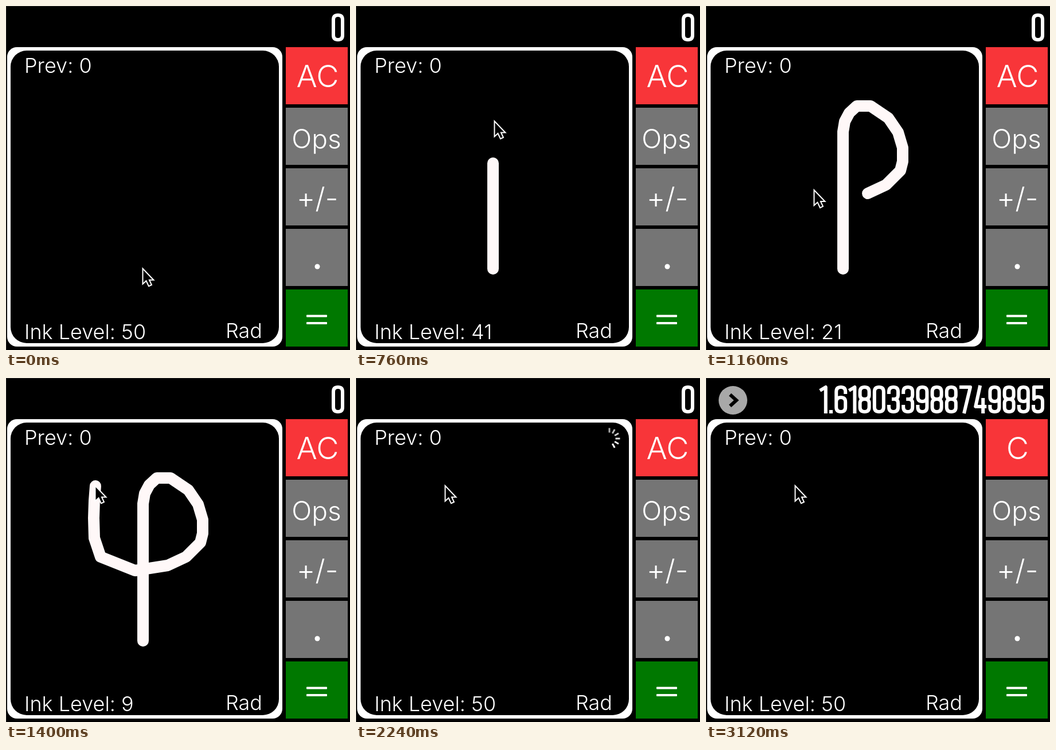
These frames come from a looping animation (600 px wide and 602 px high, 3680 ms). An HTML page with a canvas:

```html
<!DOCTYPE html>
<html lang="en">
<head>
<meta charset="utf-8">
<title>Ink calculator</title>
<style>
  html, body { margin: 0; width: 100%; height: 100%; overflow: hidden; background: #000; }
  canvas { display: block; }
</style>
</head>
<body>
<canvas id="stage" width="600" height="602"></canvas>
<script>
const ctx = document.getElementById('stage').getContext('2d');
const LOOP = 3680, TICK = 40;
const SUBMIT = 1840, RESULT = 2960;
const INK_START = 560, INK_FULL = 50;

// Pen positions: x, y, tick at which the ink reaches them
const pen = [
  [239, 460, 16], [239, 420, 17], [239, 345, 18], [239, 275, 19], [239, 220, 20],
  [242, 202, 20.6], [250, 187, 21], [263, 175, 22], [287, 175, 23], [318, 196, 24],
  [335, 221, 24.8], [343, 248, 25.6], [343, 272, 26.3], [339, 288, 27], [314, 313, 28],
  [282, 328, 29], [225, 337, 30], [165, 313, 31], [154, 280, 32], [153, 245, 33],
  [154, 215, 34], [156, 189, 35]
];
const FIRST = pen[0][2], CURSOR_LEAD = 1.6;

// Condensed display numerals, drawn as strokes in a 22 by 49 cell
const upper = 'Q3 3 11 3Q19 3 19 11', lower = 'Q19 46 11 46Q3 46 3 38';
const numerals = {
  0: 'M3 11' + upper + 'V38' + lower + 'Z',
  1: 'M0 9L10 3V49',
  3: 'M3 15V11' + upper + 'V17Q19 24 12 24H8M12 24Q19 24 19 31V38' + lower + 'V34',
  4: 'M11 0L3 37H22M16 22V49',
  5: 'M20 3H4V24Q6 20 11 20Q19 20 19 28V38' + lower + 'V34',
  6: 'M3 38V11' + upper + 'V15M3 29Q3 21 11 21Q19 21 19 29V38' + lower + 'V29',
  7: 'M0 3H19L8 49',
  8: 'M3 11' + upper + 'V17Q19 24 11 24Q3 24 3 17ZM3 31Q3 24 11 24Q19 24 19 31V38' + lower + 'Z',
  9: 'M19 20Q19 28 11 28Q3 28 3 20V11' + upper + 'V38' + lower + 'V34',
  '.': 'M0 46H6'
};
const glyphs = Object.fromEntries(
  Object.entries(numerals).map(([ch, d]) => [ch, new Path2D(d)]));
const glyphWidth = ch => ch === '.' ? 6 : ch === '1' ? 13 : 22;
const GLYPH_GAP = 3.2;

function text(str, x, y, size, align = 'left') {
  ctx.font = `350 ${size}px Inter, sans-serif`;
  ctx.textAlign = align;
  ctx.fillStyle = '#fff';
  ctx.fillText(str, x, y);
}

function rect(x, y, w, h, color, radius = 0) {
  ctx.fillStyle = color;
  ctx.beginPath();
  ctx.roundRect(x, y, w, h, radius);
  ctx.fill();
}

function disc(x, y, r, color) {
  ctx.fillStyle = color;
  ctx.beginPath();
  ctx.arc(x, y, r, 0, Math.PI * 2);
  ctx.fill();
}

function line(points, color, width, cap = 'butt') {
  ctx.strokeStyle = color;
  ctx.lineWidth = width;
  ctx.lineCap = cap;
  ctx.lineJoin = cap === 'round' ? 'round' : 'miter';
  ctx.beginPath();
  points.forEach(([x, y]) => ctx.lineTo(x, y));
  ctx.stroke();
}

function drawDisplay(value) {
  ctx.save();
  ctx.strokeStyle = '#fff';
  ctx.lineWidth = 6;
  ctx.lineCap = 'butt';
  ctx.lineJoin = 'round';
  ctx.translate(590 + GLYPH_GAP, 13);
  for (const ch of [...value].reverse()) {
    ctx.translate(-glyphWidth(ch) - GLYPH_GAP, 0);
    ctx.stroke(glyphs[ch]);
  }
  ctx.restore();
}

function drawButtons(clearLabel) {
  const colors = ['#f83539', '#757575', '#757575', '#757575', '#007800'];
  colors.forEach((color, i) => rect(488, 72 + i * 106, 108, 100, color));
  text(clearLabel, 543.5, 142, 54, 'center');
  text('Ops', 541.5, 248.5, 46, 'center');
  text('+/-', 543, 353.5, 50, 'center');
  disc(543, 456, 4.5, '#fff');
  rect(524, 540.5, 36, 4, '#fff', 1);
  rect(524, 553, 36, 4, '#fff', 1);
}

function drawPanel(ink) {
  rect(2, 72, 480, 524, '#fff', 17);
  rect(8, 78, 468, 512, '#000', 28);
  text('Prev: 0', 32, 116.5, 36);
  text('Ink Level: ' + ink, 32, 582.5, 36);
  text('Rad', 447, 581, 36, 'right');
}

function drawSpinner(elapsed) {
  const spokes = 12, head = Math.floor(elapsed / 73);
  for (let age = 0; age < spokes && age <= head; age++) {
    const a = (head - age) / spokes * Math.PI * 2;
    const at = r => [442 + Math.sin(a) * r, 106 - Math.cos(a) * r];
    ctx.globalAlpha = 1 - age / spokes * 0.8;
    line([at(10.5), at(18.5)], '#fff', 3);
  }
  ctx.globalAlpha = 1;
}

function penAt(tick) {
  const i = pen.findIndex(p => p[2] > tick);
  if (i < 0) return pen[pen.length - 1];
  const [x0, y0, t0] = pen[i - 1], [x1, y1, t1] = pen[i];
  const k = (tick - t0) / (t1 - t0);
  return [x0 + (x1 - x0) * k, y0 + (y1 - y0) * k];
}

function drawCursor(x, y) {
  const outline = new Path2D('M1 2V29L7 23.5L11.5 33L16.5 30.5L12.5 22H20Z');
  ctx.save();
  ctx.translate(x, y);
  ctx.lineWidth = 2;
  ctx.lineJoin = 'miter';
  ctx.strokeStyle = '#fff';
  ctx.fillStyle = '#000';
  ctx.fill(outline);
  ctx.stroke(outline);
  ctx.restore();
}

function inkLevel(t, tick) {
  if (t < INK_START || t >= SUBMIT) return INK_FULL;
  return Math.min(48, 79 - 2 * Math.min(tick, 35));
}

function render(now) {
  const tick = Math.floor(now % LOOP / TICK), t = tick * TICK;
  const done = t >= RESULT;

  rect(0, 0, 600, 602, '#000');
  rect(0, 0, 600, 1, '#222');
  rect(0, 0, 1, 602, '#222');
  drawDisplay(done ? '1.618033988749895' : '0');
  if (done) {
    disc(47, 39, 25, '#a8a8a8');
    line([[42, 29], [53, 39], [42, 49]], '#000', 6);
  }
  drawPanel(inkLevel(t, tick));
  drawButtons(done ? 'C' : 'AC');

  if (tick >= FIRST && t < SUBMIT) {
    line(pen.filter(p => p[2] <= tick), '#fff8f8', 20, 'round');
  }
  if (t >= SUBMIT && !done) drawSpinner(t - SUBMIT);

  const [x, y] = penAt(tick < FIRST ? FIRST : tick + CURSOR_LEAD);
  drawCursor(x - 1.5, y - 2.5);
  requestAnimationFrame(render);
}

render(performance.now());
</script>
</body>
</html>
```
